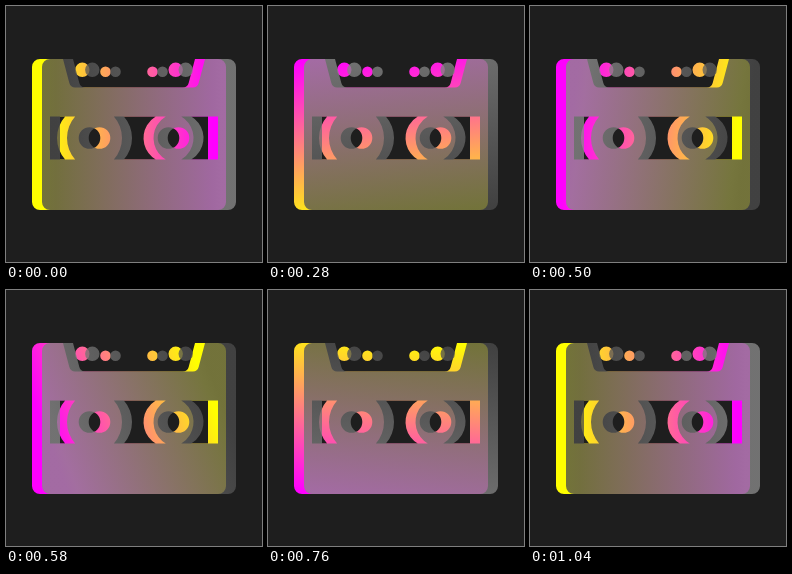
An HTML page with a canvas for the animation above (1.06 s loop, 256 px wide and 256 px high).

```html
<!DOCTYPE html>
<html lang="en">
<head>
<meta charset="utf-8">
<title>Cassette</title>
<style>
  html, body { margin: 0; width: 100%; height: 100%; overflow: hidden; background: #1e1e1e; }
  canvas { display: block; width: 256px; height: 256px; }
</style>
</head>
<body>
<canvas id="stage" width="256" height="256"></canvas>
<script>
const ctx = document.getElementById('stage').getContext('2d');
const STEP = 20, STEPS = 53;
const CX = 123, CY = 128.5, REACH = 83;
const MID = 132, HALF = 21.5;

function dot(path, x, y, r) {
  path.moveTo(x + r, y);
  path.arc(x, y, r, 0, Math.PI * 2);
  path.closePath();
}

// Tape reel cut off by the window edges, with a round hub hole.
function reel(path, x, r) {
  const a = Math.asin(HALF / r);
  path.moveTo(x + r * Math.cos(a), MID - HALF);
  path.arc(x, MID, r, -a, a);
  path.arc(x, MID, r, Math.PI - a, Math.PI + a);
  path.closePath();
  dot(path, x, MID, 10.8);
}

function makeTape() {
  const p = new Path2D();
  const left = 26, right = 220, top = 53, bottom = 204, r = 8;
  p.moveTo(left + r, top);
  p.lineTo(57, top);
  p.arcTo(64.5, 81.5, 74, 81.5, 6);
  p.arcTo(181.5, 81.5, 189, top, 6);
  p.lineTo(189, top);
  p.arcTo(right, top, right, bottom, r);
  p.arcTo(right, bottom, left, bottom, r);
  p.arcTo(left, bottom, left, top, r);
  p.arcTo(left, top, right, top, r);
  p.closePath();
  p.rect(44, MID - HALF, 158, HALF * 2);
  reel(p, 83.5, 32.5);
  reel(p, 162.5, 25);
  for (const side of [-1, 1]) {
    dot(p, CX + side * 46.7, 63.8, 7.2);
    dot(p, CX + side * 23.5, 65.8, 5.3);
  }
  return p;
}

const tape = makeTape();

function layer(shift, angle, from, to) {
  const dx = REACH * Math.cos(angle), dy = -REACH * Math.sin(angle);
  const fill = ctx.createLinearGradient(CX - dx, CY - dy, CX + dx, CY + dy);
  fill.addColorStop(0, from);
  fill.addColorStop(1, to);
  ctx.save();
  ctx.translate(shift, 0);
  ctx.fillStyle = fill;
  ctx.fill(tape, 'evenodd');
  ctx.restore();
}

function draw(now) {
  const step = Math.floor(now / STEP) % STEPS;
  const angle = step / (STEPS - 1) * Math.PI * 2;
  ctx.fillStyle = '#1e1e1e';
  ctx.fillRect(0, 0, 256, 256);
  layer(0, angle, '#ff0', '#f0f');
  layer(10, angle, 'rgba(75,75,75,.78)', 'rgba(137,137,137,.78)');
}

let start = null;
function tick(now) {
  if (start === null) start = now;
  draw(Math.max(0, now - start));
  requestAnimationFrame(tick);
}
draw(0);
requestAnimationFrame(tick);
</script>
</body>
</html>
```
